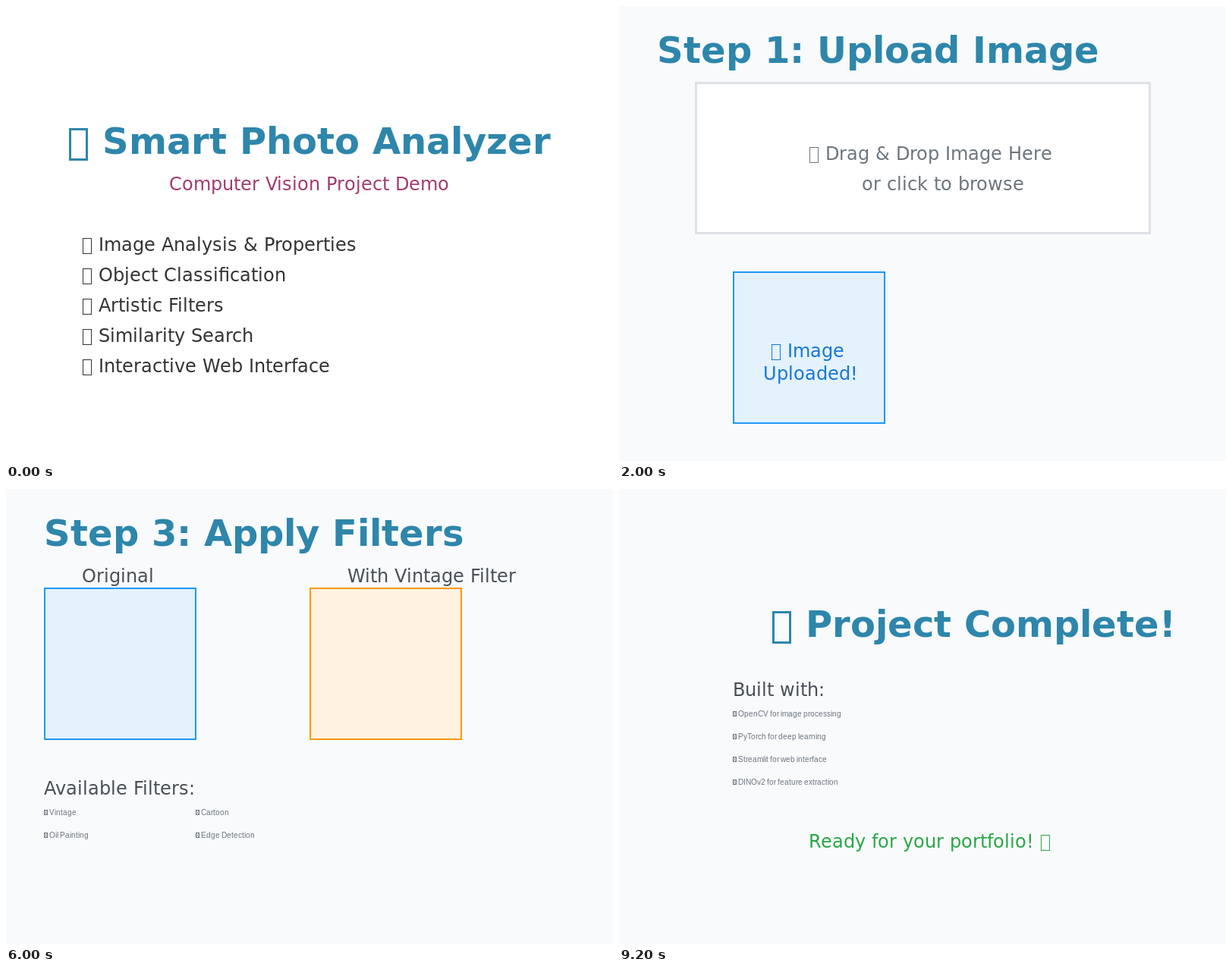
These frames come from a looping animation (800x600 px, 10 s). An HTML page with a canvas:

```html
<!DOCTYPE html>
<html lang="en">
<head>
<meta charset="utf-8">
<title>Smart Photo Analyzer</title>
<style>
html, body { margin: 0; width: 100%; height: 100%; overflow: hidden; background: #fff; }
canvas { display: block; }
</style>
</head>
<body>
<canvas id="stage" width="800" height="600"></canvas>
<script>
const ctx = document.getElementById('stage').getContext('2d');
const SLIDE_MS = 2000;
const PAGE = '#f8fafc', BLUE = '#2e86ab', HEAD = '#495057', GREY = '#6c757d', LINE = '#dee2e6', GREEN = '#28a745';

// tofu: left, top, right, bottom, stroke (relative to the pen on the baseline)
const TITLE = { font: 'bold 48px "DejaVu Sans", sans-serif', tofu: [2, -34, 27, 9, 3], tofuStep: 29 };
const BODY = { font: '24px "DejaVu Sans", sans-serif', tofu: [1, -17, 13, 4, 1], tofuStep: 14 };
const SMALL = { font: '10px "Liberation Sans", Arial, sans-serif', tofu: [0, -7, 5, 0, 1], tofuStep: 5, space: 2, crossed: true };

const width = s => ctx.measureText(s).width;

function drawTofu(style, x, y) {
  const [l, t, r, b, w] = style.tofu;
  ctx.lineWidth = w;
  ctx.strokeRect(x + l + w / 2, y + t + w / 2, r - l - w, b - t - w);
  if (!style.crossed) return;
  ctx.lineWidth = 0.6;
  ctx.beginPath();
  ctx.moveTo(x + l + 1, y + t + 1);
  ctx.lineTo(x + r - 1, y + b - 1);
  ctx.moveTo(x + r - 1, y + t + 1);
  ctx.lineTo(x + l + 1, y + b - 1);
  ctx.stroke();
}

// Sets text on whole-pixel advances; "□" stands for a missing glyph. Returns the width.
function layout(style, str, x, y, paint) {
  ctx.font = style.font;
  let pen = 0, prev = '';
  for (const g of str.match(/fi|./gu)) {
    if (g === '□') {
      if (paint) drawTofu(style, x + pen, y);
      pen += style.tofuStep;
      prev = '';
      continue;
    }
    const w = width(g);
    if (prev && prev !== ' ' && g !== ' ') pen += width(prev + g) - width(prev) - w;
    if (paint) ctx.fillText(g, x + Math.round(pen), y);
    pen += g === ' ' && style.space ? style.space : Math.round(w);
    prev = g;
  }
  return pen;
}

function text(style, color, str, x, y) {
  ctx.fillStyle = ctx.strokeStyle = color;
  layout(style, str, x, y, true);
}

function centered(style, color, str, y) {
  text(style, color, str, Math.floor((800 - layout(style, str, 0, 0, false)) / 2), y);
}

function list(style, color, items, x, y, step) {
  items.forEach((s, i) => text(style, color, s, x, y + i * step));
}

function page(color) {
  ctx.fillStyle = color;
  ctx.fillRect(0, 0, 800, 600);
}

function box(x, y, w, h, fill, edge, line) {
  ctx.fillStyle = edge;
  ctx.fillRect(x, y, w, h);
  ctx.fillStyle = fill;
  ctx.fillRect(x + line, y + line, w - 2 * line, h - 2 * line);
}

function intro() {
  page('#ffffff');
  centered(TITLE, BLUE, '□ Smart Photo Analyzer', 195);
  centered(BODY, '#a23b72', 'Computer Vision Project Demo', 243);
  list(BODY, '#333333', ['□ Image Analysis & Properties', '□ Object Classification',
    '□ Artistic Filters', '□ Similarity Search', '□ Interactive Web Interface'], 100, 323, 40);
}

function upload() {
  page(PAGE);
  text(TITLE, BLUE, 'Step 1: Upload Image', 50, 75);
  box(100, 100, 601, 201, '#ffffff', LINE, 3);
  text(BODY, GREY, '□ Drag & Drop Image Here', 250, 203);
  text(BODY, GREY, 'or click to browse', 320, 243);
  box(150, 350, 201, 201, '#e3f2fd', '#2196f3', 2);
  text(BODY, '#1976d2', '□ Image', 200, 463);
  text(BODY, '#1976d2', 'Uploaded!', 190, 493);
}

function analysis() {
  page(PAGE);
  text(TITLE, BLUE, 'Step 2: AI Analysis', 50, 75);
  box(50, 100, 701, 451, '#ffffff', LINE, 2);
  text(BODY, HEAD, '□ Image Properties:', 70, 143);
  list(SMALL, GREY, ['Dimensions: 1024 x 768', 'Channels: 3 (RGB)',
    'Brightness: 142.3', 'Contrast: 67.8'], 100, 170, 25);
  text(BODY, HEAD, '□ Object Classification:', 70, 323);
  list(SMALL, GREY, ['1. Golden Retriever - 89.2%', '2. Labrador - 7.3%', '3. Dog - 2.1%'], 100, 350, 25);
  ctx.fillStyle = GREEN;
  [181, 101, 21].forEach((w, i) => ctx.fillRect(350, 345 + i * 25, w, 16));
}

function filters() {
  page(PAGE);
  text(TITLE, BLUE, 'Step 3: Apply Filters', 50, 75);
  text(BODY, HEAD, 'Original', 100, 123);
  box(50, 130, 201, 201, '#e3f2fd', '#2196f3', 2);
  text(BODY, HEAD, 'With Vintage Filter', 450, 123);
  box(400, 130, 201, 201, '#fff2e0', '#ff9800', 2);
  text(BODY, HEAD, 'Available Filters:', 50, 403);
  list(SMALL, GREY, ['□ Vintage', '□ Oil Painting'], 50, 430, 30);
  list(SMALL, GREY, ['□ Cartoon', '□ Edge Detection'], 250, 430, 30);
}

function outro() {
  page(PAGE);
  text(TITLE, BLUE, '□ Project Complete!', 200, 195);
  text(BODY, HEAD, 'Built with:', 150, 273);
  list(SMALL, GREY, ['□ OpenCV for image processing', '□ PyTorch for deep learning',
    '□ Streamlit for web interface', '□ DINOv2 for feature extraction'], 150, 300, 30);
  text(BODY, GREEN, 'Ready for your portfolio! □', 250, 473);
}

const slides = [intro, upload, analysis, filters, outro];

function frame() {
  slides[Math.floor(performance.now() / SLIDE_MS) % slides.length]();
  requestAnimationFrame(frame);
}
frame();
</script>
</body>
</html>
```
